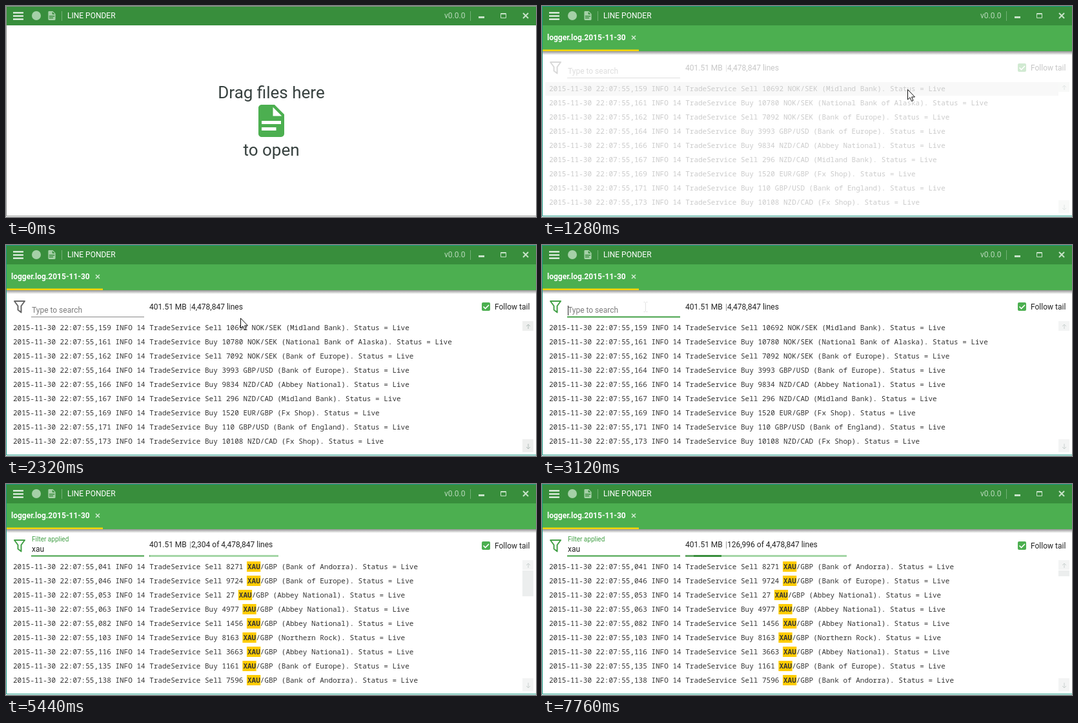
Recreate the animation shown at these times as an HTML page. Size 821x327 px, loop 8 s.

```html
<!DOCTYPE html>
<html lang="en">
<head>
<meta charset="utf-8">
<title>Log viewer</title>
<style>
  html, body { margin: 0; width: 100%; height: 100%; overflow: hidden; background: #fff; }
  svg { display: block; width: 821px; height: 327px; }
  text { font: 12px Roboto, Arial, sans-serif; fill: #222; white-space: pre; }
  .big { font-size: 26px; fill: #37413f; text-anchor: middle; }
  .log text { font: 11px "Noto Sans Mono", monospace; fill: #333; }
  .log .hit { font-weight: 700; }
  .label { font: 11.7px "Open Sans", "Noto Sans", sans-serif; fill: #111; }
</style>
</head>
<body>
<svg viewBox="0 0 821 327" xmlns="http://www.w3.org/2000/svg">
  <defs>
    <path id="doc" d="M13 9H18.5L13 3.5V9M6 2H14L20 8V20A2 2 0 0 1 18 22H6C4.9 22 4 21.1 4 20V4C4 2.9 4.9 2 6 2M15 18V16H6V18H15M18 14V12H6V14H18Z"/>
    <linearGradient id="shade" x2="0" y2="1">
      <stop stop-color="#000" stop-opacity=".42"/>
      <stop offset="1" stop-color="#000" stop-opacity="0"/>
    </linearGradient>
  </defs>
  <rect width="821" height="327" fill="#fff"/>

  <g id="empty">
    <text class="big" x="411" y="143">Drag files here</text>
    <use href="#doc" transform="translate(381 148) scale(2.5)" fill="#4caf50"/>
    <text class="big" x="411" y="232">to open</text>
  </g>

  <g id="viewer">
    <rect y="30" width="821" height="40" fill="#4caf50"/>
    <rect y="70" width="821" height="6" fill="url(#shade)"/>
    <rect y="67.5" width="150" height="2.5" fill="#ffd600"/>
    <text x="8" y="53" style="font-weight:700;fill:#fff">logger.log.2015-11-30</text>
    <path d="M139 46l6 6m0-6l-6 6" stroke="#d3ecd4" stroke-width="1.5"/>
    <g id="content">
      <path id="funnel" d="M13 87H29L23.5 94.5V104.5L18.5 100.5V94.5Z" fill="none" stroke-width="2" stroke-linejoin="round"/>
      <rect x="39" y="111" width="175" height="1" fill="#888"/>
      <rect id="focus" y="110.5" height="2" fill="#43a047"/>
      <text id="hint" x="40"></text>
      <text id="typed" x="40" y="105"></text>
      <rect id="caret" y="94" width="1" height="15" fill="#222"/>
      <text id="size" x="222">401.51 MB</text>
      <rect id="split" x="285" width="1" height="11" fill="#999"/>
      <text id="count" x="287"></text>
      <g id="progress">
        <rect id="track" x="222" y="110" height="3" fill="#a5d6a7"/>
        <rect id="bar" x="222" y="110" height="3" fill="#388e3c"/>
        <rect id="barHead" x="222" y="110" height="3" fill="#66a869"/>
      </g>
      <rect x="737" y="89" width="13" height="13" rx="2" fill="#4caf50"/>
      <path d="M739.5 95.5l3 3 5.5-5.5" fill="none" stroke="#fff" stroke-width="1.6"/>
      <text x="757" y="100">Follow tail</text>
      <rect id="hover" x="5" y="118" width="795" height="21" fill="#e4e6e5"/>
      <g id="all" class="log"></g>
      <g id="found" class="log"></g>
      <g id="scroll">
        <path d="M800 118h17v15h-17zM800 301h17v20h-17z" fill="#e6e8e7"/>
        <path d="M809 130v-7m-3 3l3-3 3 3M809 308v8m-3-3l3 3 3-3" fill="none" stroke="#8a9a96"/>
      </g>
      <rect id="thumb" x="800" y="134" width="17" fill="#eceeee"/>
    </g>
  </g>

  <rect width="821" height="30" fill="#388e3c"/>
  <path d="M11 10.5h16M11 15.5h16M11 20.5h16" stroke="#fff" stroke-width="2"/>
  <circle cx="47" cy="15" r="7" fill="#a5d0a7"/>
  <use href="#doc" transform="translate(62.6 6.6) scale(.7)" fill="#a5d0a7"/>
  <path d="M86.5 8v15M719.5 8v15" stroke="#72b175"/>
  <text x="95" y="19" style="fill:#fff">LINE PONDER</text>
  <text x="679" y="19" style="fill:#b9dabb">v0.0.0</text>
  <path d="M732 17.5h9" stroke="#c8e3c9" stroke-width="3"/>
  <path d="M766.5 11.5h8v7h-8zM766 12.5h9" fill="none" stroke="#c8e3c9"/>
  <path d="M801 11l8 8m0-8l-8 8" stroke="#c8e3c9" stroke-width="2"/>
  <path id="frame" d="M821 .5H.5V325.5H821" fill="none"/>

  <g id="pointer">
    <path d="M.5 .5V16L4 12.8L6.5 18.5L9 17.4L6.6 12H11.5Z" fill="#fff" stroke="#111"/>
    <g id="drag">
      <rect x="2.5" y="17.5" width="11" height="7" fill="#fff" stroke="#111" stroke-dasharray="1 1"/>
      <use href="#doc" transform="translate(-6.2 25.8) scale(1.1)" fill="#4caf50"/>
      <text class="label" x="22" y="43">logger.log.2015-11-30</text>
    </g>
  </g>
  <path id="beam" d="M-3 -7.5h2l1 1 1-1h2M0 -6.5v13M-3 7.5h2l1-1 1 1h2" fill="none" stroke="#e2e2e2"/>
</svg>
<script>
const LOOP = 8000, STEP = 80, CHAR = 6.6, TOTAL = '4,478,847 lines';
const $ = id => document.getElementById(id);
const set = (id, attrs) => { for (const k in attrs) $(id).setAttribute(k, attrs[k]); };
const show = (id, on) => set(id, { visibility: on ? 'inherit' : 'hidden' });
const clamp = v => Math.max(0, Math.min(1, v));
const mix = (a, b, p) => a + (b - a) * p;

const trades = [
  '159 Sell 10692 NOK/SEK (Midland Bank)',
  '161 Buy 10780 NOK/SEK (National Bank of Alaska)',
  '162 Sell 7092 NOK/SEK (Bank of Europe)',
  '164 Buy 3993 GBP/USD (Bank of Europe)',
  '166 Buy 9834 NZD/CAD (Abbey National)',
  '167 Sell 296 NZD/CAD (Midland Bank)',
  '169 Buy 1520 EUR/GBP (Fx Shop)',
  '171 Buy 110 GBP/USD (Bank of England)',
  '173 Buy 10108 NZD/CAD (Fx Shop)'
];
const matches = [
  '041 Sell 8271 XAU/GBP (Bank of Andorra)',
  '046 Sell 9724 XAU/GBP (Bank of Europe)',
  '053 Sell 27 XAU/GBP (Abbey National)',
  '063 Buy 4977 XAU/GBP (Abbey National)',
  '082 Sell 1456 XAU/GBP (Abbey National)',
  '103 Buy 8163 XAU/GBP (Northern Rock)',
  '116 Sell 3663 XAU/GBP (Abbey National)',
  '135 Buy 1161 XAU/GBP (Bank of Europe)',
  '138 Sell 7596 XAU/GBP (Bank of Andorra)'
];

function logRow(entry, i) {
  const line = `2015-11-30 22:07:55,${entry.slice(0, 3)} INFO 14 TradeService ${entry.slice(4)}. Status = Live`;
  const y = 132 + 22 * i, at = line.indexOf('XAU');
  const mark = at < 0 ? '' :
    `<rect x="${11 + at * CHAR - 1}" y="${y - 12}" width="${3 * CHAR + 1.5}" height="16" fill="#ffcc00"/>`;
  return `${mark}<text x="11" y="${y}">${line.replace('XAU', '<tspan class="hit">XAU</tspan>')}</text>`;
}
$('all').innerHTML = trades.map(logRow).join('');
$('found').innerHTML = matches.map(logRow).join('');

// Each list holds [time, ...values]
const dragPath = [[400, 541, 275], [480, 543, 258], [560, 547, 233], [640, 553, 201],
  [720, 559, 162], [800, 563, 140], [880, 565, 129]];
const counts = [[5440, 2304], [5680, 6118], [5840, 11902], [6000, 17440], [6160, 22915],
  [6240, 27676], [6400, 36082], [6480, 41350], [6640, 52764], [7200, 93114], [7600, 126996]];
const blinks = [3040, 3440, 4000, 5440, 6000, 6560, 7120, 7760];
const keys = [4480, 4720, 4960];
const carets = [40, 46, 52, 59];
const last = (list, t) => list.filter(k => k[0] <= t).pop();

function drawPointer(t) {
  const dragging = t >= 400 && t < 1040;
  let [x, y] = t < 1040 ? (last(dragPath, t) || dragPath[0]).slice(1) : [566, 129];
  if (t >= 2080) {
    const p = clamp((t - 2000) / 640), e = p * p * (3 - 2 * p);
    x = mix(566, 160, e);
    y = mix(129, 96, e);
  }
  const overBox = x < 214;
  set('pointer', { transform: `translate(${Math.round(x)} ${Math.round(y)})` });
  set('beam', { transform: `translate(${Math.round(x) + .5} ${Math.round(y)})` });
  show('pointer', t >= 400 && !overBox);
  show('drag', dragging);
  show('beam', overBox && t < 4480);
  show('hover', t < 2640 && y > 117);
}

function drawSearch(t) {
  const n = keys.filter(k => k <= t).length;
  const grow = clamp((t - 2800) / 320), rise = clamp((t - 4400) / 240);
  set('funnel', { stroke: t >= 2640 ? '#43a047' : '#666' });
  set('focus', { x: 126.5 - 87.5 * grow, width: 175 * grow });
  $('hint').textContent = n === 3 ? 'Filter applied' : rise === 1 ? 'Enter at least 3 characters' : 'Type to search';
  set('hint', {
    y: mix(105, 89, rise),
    style: `font-size:${mix(12, 10, rise)}px;fill:${n ? '#43a047' : '#7b7b7b'}`
  });
  $('typed').textContent = 'xau'.slice(0, n);
  set('caret', { x: carets[n] });
  show('caret', blinks.filter(b => b <= t).length % 2 === 1);
}

function drawResults(t) {
  const hit = last(counts, t), n = hit ? hit[1] : 0;
  const full = t >= 6320 ? 250 : 200, done = full * n / 567000;
  const base = hit ? 98 : 100;
  $('count').textContent = hit ? `${n.toLocaleString('en-US')} of ${TOTAL}` : TOTAL;
  set('count', { y: base });
  set('size', { y: base });
  set('split', { y: base - 9 });
  set('track', { width: full });
  set('bar', { width: done });
  set('barHead', { width: Math.min(13, done) });
  set('thumb', { height: mix(40, 9, clamp((t - 5440) / 480)) });
  for (const id of ['progress', 'found', 'thumb']) show(id, hit);
  show('all', !hit);
  set('scroll', { opacity: mix(1, .45, clamp((t - 2080) / 400)) });
}

function draw(time) {
  const t = Math.floor(time % LOOP / STEP) * STEP, open = t >= 1280;
  set('frame', { stroke: t < 80 ? '#8f9391' : '#1c9a86' });
  set('viewer', { visibility: open ? 'visible' : 'hidden' });
  show('empty', !open);
  set('content', { opacity: clamp((t - 1200) / 320) });
  drawSearch(t);
  drawResults(t);
  drawPointer(t);
}

function tick(now) {
  draw(now);
  requestAnimationFrame(tick);
}
draw(0);
requestAnimationFrame(tick);
</script>
</body>
</html>
```
